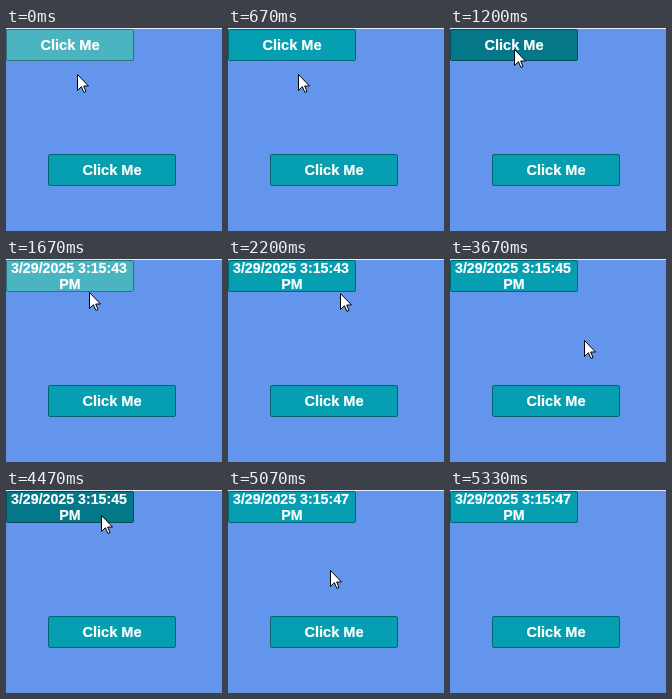
Animation, 216 px wide and 203 px high, one loop 6000 ms. Source, as an HTML page:

```html
<!DOCTYPE html>
<html lang="en">
<head>
<meta charset="utf-8">
<title>Button states</title>
<style>
  html, body { margin: 0; width: 100%; height: 100%; overflow: hidden; background: #6495ed; }
  svg { display: block; }
  text {
    font: bold 14.6px "Liberation Sans", Arial, sans-serif;
    fill: #fff;
    stroke: #fff;
    stroke-width: .2px;
    text-anchor: middle;
  }
  .date { font-size: 14.2px; }
  .button rect { fill: #069fb1; stroke: #046470; }
  .button.hover rect { fill: #4ab4c1; stroke: #2e737a; }
  .button.pressed rect { fill: #047889; stroke: #034c57; }
</style>
</head>
<body>
<svg width="216" height="203" viewBox="0 0 216 203">
  <rect width="216" height="203" fill="#6495ed"/>
  <path d="M0 .5H216" stroke="#e4ebfa"/>
  <g id="top" class="button" transform="translate(0 1)">
    <rect x=".5" y=".5" width="127" height="31" rx="1.5"/>
    <text id="label" x="64" y="21">Click Me</text>
    <text id="date" class="date" x="63" y="13"></text>
    <text id="half" class="date" x="64" y="29"></text>
  </g>
  <g id="low" class="button" transform="translate(42 126)">
    <rect x=".5" y=".5" width="127" height="31" rx="1.5"/>
    <text x="64" y="21">Click Me</text>
  </g>
  <path id="cursor" d="M.5 .5V16.5L4.4 12.7 6.9 18.4 9 17.6 6.7 12H11.5Z" fill="#fff" stroke="#000"/>
</svg>
<script>
const FPS = 15, TICKS = 90;
const origin = { x: 70, y: 30 };

// The cursor glides to each point between two ticks.
const glides = [
  { from: 0, to: 0, x: 71, y: 46 },
  { from: 1, to: 3, x: 72, y: 54 },
  { from: 9, to: 15, x: 64, y: 21 },
  { from: 24, to: 28, x: 114, y: 54 },
  { from: 31, to: 33, x: 112, y: 34 },
  { from: 34, to: 36, x: 110, y: 22 },
  { from: 47, to: 47, x: 110, y: 31 },
  { from: 48, to: 52, x: 141, y: 85 },
  { from: 55, to: 55, x: 134, y: 81 },
  { from: 56, to: 63, x: 95, y: 25 },
  { from: 75, to: 80, x: 120, y: 212 }
];
const clicks = [{ down: 18, up: 20 }, { down: 40, up: 42 }, { down: 67, up: 70 }];

const el = id => document.getElementById(id);
const buttons = [{ node: el("top"), x: 0, y: 1 }, { node: el("low"), x: 42, y: 126 }];

// Halfway between linear and smoothstep.
const ease = p => (p + p * p * (3 - 2 * p)) / 2;

function cursorAt(tick) {
  let { x, y } = origin;
  for (const g of glides) {
    if (tick < g.from) break;
    const k = ease(Math.min(1, (tick - g.from + 1) / (g.to - g.from + 1)));
    x += (g.x - x) * k;
    y += (g.y - y) * k;
  }
  return { x: Math.round(x), y: Math.round(y) };
}

const inside = (p, b) => p.x >= b.x && p.x < b.x + 128 && p.y >= b.y && p.y < b.y + 32;

function draw(tick) {
  const { x, y } = cursorAt(tick);
  el("cursor").setAttribute("transform", `translate(${x} ${y})`);

  // Buttons react one tick after the cursor.
  const seen = cursorAt(tick - 1);
  const held = clicks.some(c => tick >= c.down && tick < c.up);
  for (const b of buttons) {
    const state = !inside(seen, b) ? "" : held ? "pressed" : "hover";
    b.node.setAttribute("class", "button " + state);
  }

  const last = clicks.findLast(c => c.up <= tick);
  const second = last && Math.floor(42.5 + last.up / FPS);
  el("label").textContent = last ? "" : "Click Me";
  el("date").textContent = last ? `3/29/2025 3:15:${second}` : "";
  el("half").textContent = last ? "PM" : "";
}

const start = performance.now();
let shown = -1;
function frame() {
  // The small lead absorbs times rounded to 10 ms.
  const tick = Math.floor((performance.now() - start + 4) * FPS / 1000) % TICKS;
  if (tick !== shown) draw(shown = tick);
  requestAnimationFrame(frame);
}
frame();
</script>
</body>
</html>
```
